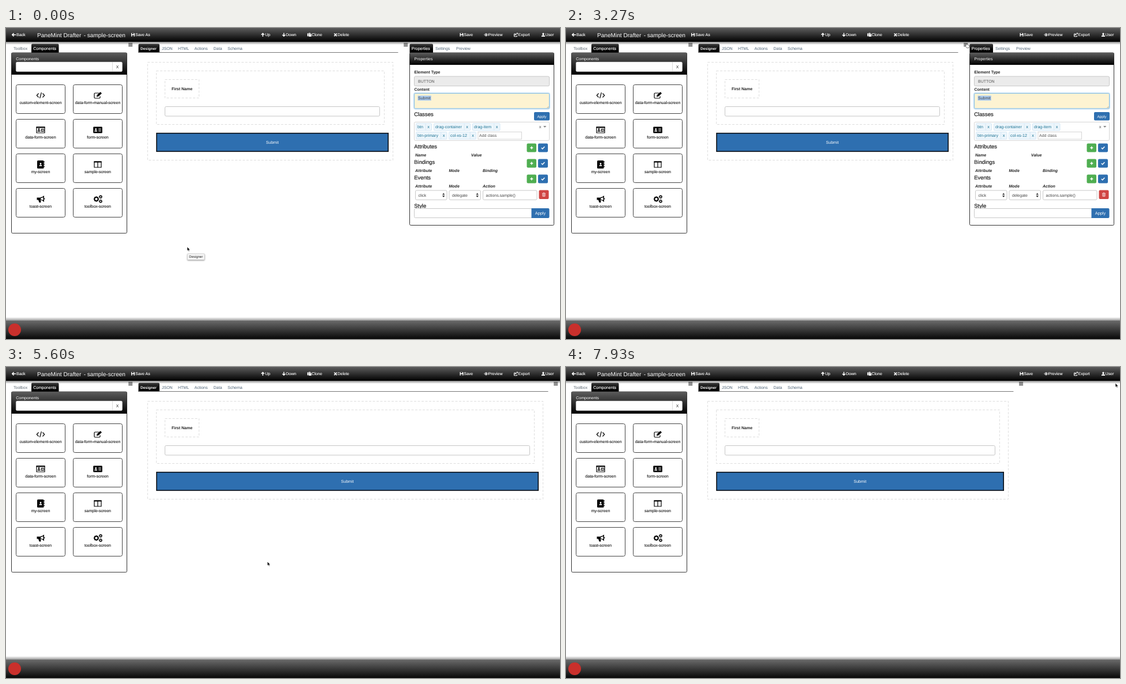
An HTML page for the animation above (8000 ms loop, 960 by 540 pixels).

```html
<!DOCTYPE html>
<html lang="en">
<head>
<meta charset="utf-8">
<title>Screen designer</title>
<style>
  html, body { margin: 0; width: 100%; height: 100%; overflow: hidden; background: #fff; }
  svg { display: block; width: 960px; height: 540px; }
  text { font-family: 'Liberation Sans', Arial, sans-serif; white-space: pre; text-rendering: geometricPrecision; }
</style>
</head>
<body>
<svg id="stage" viewBox="0 0 960 540" xmlns="http://www.w3.org/2000/svg">
  <defs>
    <linearGradient id="bar" x2="0" y2="1"><stop stop-color="#5c5c5c"/><stop offset="1" stop-color="#000"/></linearGradient>
    <linearGradient id="foot" x2="0" y2="1"><stop stop-color="#6a6a6a"/><stop offset="1" stop-color="#080808"/></linearGradient>
    <linearGradient id="tab" x2="0" y2="1"><stop stop-color="#3a3a3a"/><stop offset=".6" stop-color="#060606"/><stop offset="1" stop-color="#000"/></linearGradient>
    <linearGradient id="down" x2="0" y2="1"><stop stop-color="#000" stop-opacity=".45"/><stop offset="1" stop-color="#000" stop-opacity="0"/></linearGradient>
    <linearGradient id="up" x2="0" y2="1"><stop stop-color="#000" stop-opacity="0"/><stop offset="1" stop-color="#000" stop-opacity=".4"/></linearGradient>
  </defs>
</svg>
<script>
const NS = 'http://www.w3.org/2000/svg';
const svg = document.getElementById('stage');
let host = svg;

function add(tag, attrs, content) {
  const el = document.createElementNS(NS, tag);
  for (const k in attrs) el.setAttribute(k, attrs[k]);
  if (content) el.textContent = content;
  return host.appendChild(el);
}
const rect = (x1, y1, x2, y2, fill, stroke = 'none', r = 0, more = {}) =>
  add('rect', { x: x1, y: y1, width: x2 - x1, height: y2 - y1, rx: r, fill, stroke, ...more });
const text = (x, y, s, fill = '#222', size = 7, more = {}) =>
  add('text', { x, y, fill, 'font-size': size, ...more }, s);
const path = (d, more = {}) => add('path', { d, ...more });
const MID = { 'text-anchor': 'middle' };
const BOLD = { 'font-weight': 'bold' };
function group(attrs, draw) {
  const outer = host, g = add('g', attrs);
  host = g;
  draw();
  host = outer;
  return g;
}
function icon(x, y, color, parts) {
  group({ transform: `translate(${x} ${y})`, fill: color, stroke: 'none' }, () => {
    for (const [d, width, inner] of parts)
      path(d, width ? { fill: 'none', stroke: inner || color, 'stroke-width': width } : { fill: inner || color });
  });
}
const burger = (x, y) => path(`M${x - 3.5} ${y - 2.5}h7m-7 1.7h7m-7 1.7h7m-7 1.7h7`, { stroke: '#444', 'stroke-width': 1 });
const tab = (x1, x2) => path(`M${x1} 43V29.5q0-2 2-2H${x2 - 2}q2 0 2 2V43Z`, { fill: 'url(#tab)' });

// ---- top and bottom bars
rect(0, 24, 960, 29, 'url(#down)');
rect(0, 0, 960, 24, 'url(#bar)');
rect(0, 502, 960, 508, 'url(#up)');
rect(0, 508, 960, 540, 'url(#foot)');
add('circle', { cx: 15, cy: 524, r: 11, fill: '#c9302c' });

const disk = [['M-3-3H2L3-2V3H-3Z'], ['M-1.6-3h2.6v2h-2.6zM-1.8.8h3.6v2.2h-3.6z', 0, '#222']];
const ICONS = {
  back: [['M3.5 0H-2.5M0-2.7-2.7 0 0 2.7', 1.5]],
  up: [['M0 3.3V-2M-2.5 0 0-2.5 2.5 0', 1.5]],
  down: [['M0-3.3V2M-2.5 0 0 2.5 2.5 0', 1.5]],
  disk,
  clone: [['M-3.5-2.5h2.7v5h-2.7z'], ['M-1-3.2h2.3l2.2 2v4.5h-4.5z'], ['M-1.2-2.8v5.8M1.2-3v2h2', .5, '#222']],
  cross: [['M-2.3-2.3 2.3 2.3M2.3-2.3-2.3 2.3', 1.7]],
  eye: [['M-3.3 0Q0-4.4 3.3 0Q0 4.4-3.3 0Z', .9], ['M-1.4 0a1.4 1.4 0 1 0 2.8 0a1.4 1.4 0 1 0-2.8 0Z']],
  share: [['M-.5-1.6H-3V3H2V1.2', 1], ['M-1.4 1.2Q-1-1.2 1.5-1.4', 1.2], ['M.8-3.4H3.5V-.4Z']],
  user: [['M-1.7-1.5a1.7 1.9 0 1 0 3.4 0a1.7 1.9 0 1 0-3.4 0ZM-3.3 3.2Q-3.2.9-1 .7H1Q3.2.9 3.3 3.2Z']]
};
[['back', 13.5, 'Back', 18], ['disk', 220, 'Save As', 224], ['up', 445, 'Up', 449], ['down', 481.5, 'Down', 485],
 ['clone', 525.7, 'Clone', 529.5], ['cross', 571, 'Delete', 574.5], ['disk', 789.5, 'Save', 793.3],
 ['eye', 832, 'Preview', 835.6], ['share', 883.5, 'Export', 887.5], ['user', 931, 'User', 934.5]
].forEach(([name, x, label, tx]) => {
  icon(x, 11.8, '#fff', ICONS[name]);
  text(tx, 14.4, label, '#fff', 7, { stroke: '#fff', 'stroke-width': .12 });
});
text(54, 15.6, 'PaneMint Drafter', '#fff', 10.1);
text(207, 15.6, '- sample-screen', '#fff', 10.1, { 'text-anchor': 'end' });

// ---- components panel
text(13, 37.5, 'Toolbox', '#5a6570');
tab(44, 91.5);
text(47.3, 37.5, 'Components', '#fff', 7, { stroke: '#fff', 'stroke-width': .15 });
burger(215.7, 29);
rect(9.5, 43, 209.5, 356.3, '#fff', '#333', 2);
rect(9.5, 43, 209.5, 81, 'url(#bar)');
text(17.3, 56, 'Components', '#fff');
rect(17.3, 59, 201.5, 75.7, '#fff', '#ccc', 2, { 'stroke-width': .5 });
path('M184.5 59.3V75.4', { stroke: '#ccc', 'stroke-width': .7 });
text(193, 69.8, 'X', '#222', 7, MID);

const gear = (x, y, r) => {
  let d = '';
  for (let i = 0; i < 8; i++) {
    const a = i * Math.PI / 4, c = Math.cos(a), s = Math.sin(a);
    d += `M${x + c * r} ${y + s * r}L${x + c * (r + 1.5)} ${y + s * (r + 1.5)}`;
  }
  return [[`M${x - r} ${y}a${r} ${r} 0 1 0 ${2 * r} 0a${r} ${r} 0 1 0 ${-2 * r} 0`, r * .65], [d, 1.2]];
};
const person = (x, color) => [[`M${x - 1.4}-1.4a1.4 1.6 0 1 0 2.8 0a1.4 1.6 0 1 0-2.8 0ZM${x - 2.6} 2.8Q${x - 2.4} .5 ${x} .5T${x + 2.6} 2.8Z`, 0, color]];
const CARDS = [
  ['custom-element-screen', [['M-3.5-3.5-6.7 0-3.5 3.5M3.5-3.5 6.7 0 3.5 3.5M1.4-5-1.4 5', 1.2]]],
  ['data-form-manual-screen', [['M2-4H-4.5Q-6-4-6-2.5V3.5Q-6 5-4.5 5H2.5Q4 5 4 3.5V1.5', 1.2], ['M-2 2.5-1.5-.5 4.5-6 7-3.5 1 2Z'], ['M-.8 0 .8 1.5', .6, '#fff']]],
  ['data-form-screen', [['M-7-5H7V5H-7Z', 1.2], ['M-7.5-5.5h15v2h-15z'], ...person(-3, '#000'), ['M1-1.5h4.5v4h-4.5zM2.8-1.5v4', .9]]],
  ['form-screen', [['M-6.5-5.5h13q1.3 0 1.3 1.3v8.4q0 1.3-1.3 1.3h-13q-1.3 0-1.3-1.3v-8.4q0-1.3 1.3-1.3Z'], ...person(-3.3, '#fff'), ['M1.2-2.2h4.6M1.2 0h4.6M1.2 2.2h4.6', .9, '#fff']]],
  ['my-screen', [['M-4.5-7H4q1.5 0 1.5 1.5v11q0 1.5-1.5 1.5h-8.5q-1.5 0-1.5-1.5v-11q0-1.5 1.5-1.5Z'], ['M5.5-4.5h1.3m-1.3 4h1.3m-1.3 4h1.3', 1.8], ...person(0, '#fff')]],
  ['sample-screen', [['M-6-5H6V5H-6ZM0-5V5', 1.2], ['M-6.5-5.5h13v2h-13z']]],
  ['toast-screen', [['M-6.5-2.5H-1Q3-3 6-6V5Q3 2 0 1.5L.5 6H-2.5L-4 1.5H-6.5Z'], ['M0-1.2Q3-2 4.5-3.2V2.3Q3 1 0 .4Z', 0, '#fff'], ['M6.8-1.5v2', 1.2]]],
  ['toolbox-screen', [...gear(-2.5, 0, 3.2), ...gear(5, -3.8, 1.6), ...gear(5, 3.8, 1.6)]]
];
CARDS.forEach(([label, parts], i) => {
  const x = 17.5 + (i % 2) * 99, y = 98.5 + (i >> 1) * 60;
  rect(x, y, x + 85, y + 50, '#fff', '#444', 3);
  icon(x + 42.5, y + 18.5, '#000', parts);
  text(x + 42.5, y + 33.3, label, '#111', 7, { ...MID, stroke: '#111', 'stroke-width': .1 });
});

// ---- designer
tab(229.5, 266);
text(233, 37.5, 'Designer', '#fff', 7, BOLD).setAttribute('font-size', 6.5);
[['JSON', 270], ['HTML', 298], ['Actions', 326.5], ['Data', 359.5], ['Schema', 384]]
  .forEach(([s, x]) => text(x, 37.5, s, '#4d6275'));
const DASH = { 'stroke-dasharray': '4 2.5' };
const stretchy = [
  rect(229.5, 42, 679.5, 43, '#777'),
  rect(245.5, 59.5, 670.5, 229.5, 'none', '#dedede', 0, DASH),
  rect(260.5, 74.5, 655.5, 167.5, 'none', '#dedede', 0, DASH),
  rect(275.5, 136.5, 647.5, 153, '#fff', '#c6c6c6', 2),
  rect(261, 182.7, 662.3, 214.3, '#2e6fb0', '#0a0d12', 0, { 'stroke-width': 1.6 })
].map(el => [el, +el.getAttribute('width')]);
rect(275.5, 89.5, 334.5, 121.5, 'none', '#dedede', 0, DASH);
text(305, 108, 'First Name', '#222', 7, { ...MID, ...BOLD });
const submit = text(461.5, 200.8, 'Submit', '#fff', 7, MID);
const grip = group({}, () => burger(692.7, 29));

// ---- properties
const BLUE = '#2e6fb0', LINE = '#c8c8c8';
const corner = (x, y) => path(`M${x - 3} ${y}l3-3m-1.3 3l1.3-1.3`, { stroke: '#888', 'stroke-width': .6 });
const head = (y, s) => text(707.3, y, s, '#222', 9.4, { stroke: '#222', 'stroke-width': .22 });
const props = group({}, () => {
  tab(699.5, 740);
  text(702.8, 37.5, 'Properties', '#fff', 7, { stroke: '#fff', 'stroke-width': .15 });
  text(744, 37.5, 'Settings', '#4d6275');
  text(780, 37.5, 'Preview', '#4d6275');
  rect(699.5, 43, 949.5, 342.5, '#fff', '#333', 2);
  rect(699.5, 43, 949.5, 64, 'url(#bar)');
  text(707.5, 56, 'Properties', '#fff');
  text(707.5, 79, 'Element Type', '#222', 7, BOLD);
  rect(707.5, 84, 941.5, 100.7, '#ebebeb', LINE, 2);
  text(714, 95, 'BUTTON', '#555');
  text(707.5, 108.5, 'Content', '#222', 7, BOLD);
  rect(706.7, 112.7, 942.3, 140.7, 'none', '#d3e8f7', 3, { 'stroke-width': 2 });
  rect(707.5, 113.5, 941.5, 139.8, '#fdf3d2', '#83bce4', 2);
  rect(713.5, 117.5, 736.8, 126, '#a8c8ec');
  text(714, 124.4, 'Submit', '#444');
  corner(940.5, 139);

  head(153.3, 'Classes');
  rect(915, 146, 942, 160.5, BLUE, 'none', 2);
  text(928.5, 155.6, 'Apply', '#fff', 6.4, MID);
  rect(707.5, 163.3, 941.5, 195.3, '#fff', '#d4d4d4', 2);
  [['btn', 710.5, 737.5, 0], ['drag-container', 741.5, 804.5, 0], ['drag-item', 808.5, 856, 0],
   ['btn-primary', 710.5, 764, 1], ['col-xs-12', 767.5, 814.5, 1]].forEach(([s, x1, x2, row]) => {
    const y = 165.7 + row * 15;
    rect(x1, y, x2, y + 12.3, '#edf6fc', '#cfe4f3', 1, { 'stroke-width': .8 });
    path(`M${x2 - 10.3} ${y}v12.3`, { stroke: '#cfe4f3', 'stroke-width': .7 });
    text(x1 + 2.6, y + 8.5, s, '#1c7293', 7.1);
    text(x2 - 5.3, y + 8.3, 'x', '#1c7293', 7.5, MID);
  });
  rect(818, 180.5, 893.5, 193, '#fff', '#ccc', 0, { 'stroke-width': .8 });
  text(820, 189.1, 'Add class', '#555');
  text(925.5, 174, 'x', '#555', 7.5, MID);
  path('M931 170h5.4l-2.7 2.9Z', { fill: '#888' });

  [['Attributes', 208.5, [['Name', 709], ['Value', 806]]],
   ['Bindings', 235.5, [['Attribute', 709], ['Mode', 767.5], ['Binding', 826]]],
   ['Events', 262.5, [['Attribute', 709], ['Mode', 767.5], ['Action', 826]]]].forEach(([s, y, cols]) => {
    head(y, s);
    rect(902.5, y - 8, 919, y + 7, '#4fae51', 'none', 2);
    icon(910.8, y - .5, '#fff', [['M-2.5 0h5M0-2.5v5', 1.5]]);
    rect(922, y - 8, 939, y + 7, BLUE, 'none', 2);
    icon(930.5, y - .5, '#fff', [['M-2.7 0-.8 2 2.8-2', 1.5]]);
    cols.forEach(([c, x]) => text(x, y + 14, c, '#222', 7, { ...BOLD, 'font-style': 'italic' }));
  });
  [[709.5, 764, 'click', 1], [768, 822.5, 'delegate', 1], [826.5, 920, 'actions.sample()', 0]].forEach(([x1, x2, s, menu]) => {
    rect(x1, 282, x2, 298.3, '#fff', LINE, 2);
    text(x1 + 5, 292.6, s, '#444');
    if (menu) path(`M${x2 - 8} 289.4h4.4l-2.2-2.9zM${x2 - 8} 291h4.4l-2.2 2.9z`, { fill: '#333' });
  });
  rect(923.5, 281.5, 940.5, 297, '#d04543', 'none', 2);
  icon(932, 289.2, '#fff', [['M-2-1.6V3H2V-1.6M-3-2h6M-1-3h2', .8], ['M-.7-1v3.3M.7-1v3.3', .6]]);

  head(311.5, 'Style');
  rect(707.5, 313.5, 912, 329.5, '#fff', LINE, 2);
  path('M910.5 313H939.5q2 0 2 2V328q0 2-2 2H910.5Z', { fill: BLUE });
  text(926, 324.3, 'Apply', '#fff', 7.3, MID);
});
const leftover = group({}, () => corner(940.5, 179.5));

const tip = group({ style: 'filter:drop-shadow(0 1px 1.2px rgba(0,0,0,.4))' }, () => {
  rect(314.3, 392, 344, 402.5, '#f6f6f6', '#c4c4c4', 1, { 'stroke-width': .6 });
  text(329.2, 399.3, 'Designer', '#222', 6, MID);
});

const SKIN = { stroke: '#fff', 'stroke-width': .6, 'stroke-linejoin': 'round' };
const pointer = group({}, () => {});
host = pointer;
const arrow = path('M0 0V7L1.6 5.6 2.7 8.1 3.9 7.6 2.9 5.2H5Z', { fill: '#000', ...SKIN });
const hand = path('M1.2 4.6V.8q.8-1 1.5 0V3q1-.5 1.4.2 1-.4 1.3.3 1.1-.3 1.3.6V6.2L6 8.6H2.4L.2 5.4q0-1 1-.8Z',
  { fill: '#fff', stroke: '#222', 'stroke-width': .6 });
host = svg;

// ---- motion
const LOOP = 8000;
const TRACK = [ // time, x, y
  [0, 314, 380], [760, 314, 380], [1330, 316, 305], [2000, 316, 305], [2070, 322, 303],
  [2400, 440, 190], [2870, 655, 55], [3270, 692, 26], [3735, 692, 26], [3800, 694, 26],
  [5080, 694, 26], [5270, 600, 150], [5460, 456, 346], [5600, 453, 338], [5800, 452, 325],
  [6010, 452, 325], [6400, 690, 170], [6870, 941, 30], [7130, 951, 23], [7470, 952, 28], [LOOP, 952, 28]
];
function spot(t) {
  const i = Math.max(1, TRACK.findIndex(k => k[0] > t));
  const [t0, x0, y0] = TRACK[i - 1], [t1, x1, y1] = TRACK[i];
  const p = (t - t0) / (t1 - t0);
  return [x0 + (x1 - x0) * p, y0 + (y1 - y0) * p];
}
const clamp = v => Math.min(1, Math.max(0, v));
// cubic-bezier(.25, .1, .25, 1)
function ease(x) {
  const at = (a, b, u) => 3 * a * u * (1 - u) ** 2 + 3 * b * u * u * (1 - u) + u ** 3;
  let lo = 0, hi = 1;
  for (let i = 0; i < 20; i++) {
    const m = (lo + hi) / 2;
    if (at(.25, .25, m) < x) lo = m; else hi = m;
  }
  return at(.1, 1, lo);
}
const SHUT = 3735, OPEN = 7748, SPAN = 500, REACH = 260;
const show = (el, on) => el.setAttribute('visibility', on ? 'visible' : 'hidden');

function draw(now) {
  const t = now % LOOP;
  const d = REACH * (ease(clamp((t - SHUT) / SPAN)) - ease(clamp((t - OPEN) / SPAN)));
  stretchy.forEach(([el, w]) => el.setAttribute('width', w + d));
  submit.setAttribute('x', 461.5 + d / 2);
  grip.setAttribute('transform', `translate(${d} 0)`);
  show(props, t < SHUT);
  show(leftover, t > SHUT + 130 && t < SHUT + SPAN);
  tip.setAttribute('opacity', 1 - clamp((t - 2700) / 330));
  const [x, y] = spot(t);
  pointer.setAttribute('transform', `translate(${x} ${y})`);
  const over = (t > 3200 && t < SHUT) || (t > 7250 && t < OPEN);
  show(hand, over);
  show(arrow, !over);
  requestAnimationFrame(frame);
}
function frame() { draw(performance.now()); }
draw(0);
</script>
</body>
</html>
```
